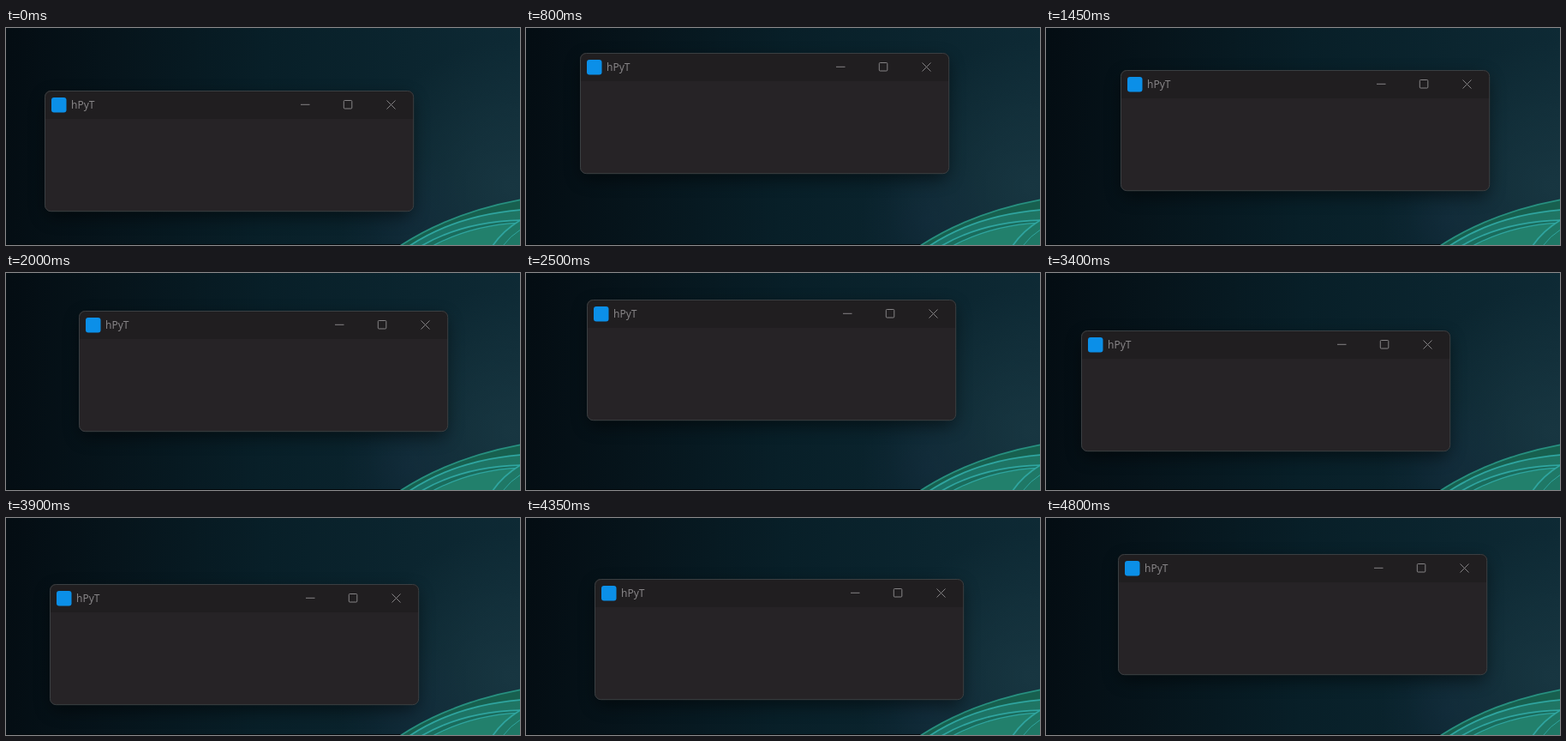
Animation of 600 by 253 pixels, one loop 4.85 s. Source, as an HTML page:

```html
<!DOCTYPE html>
<html lang="en">
<head>
<meta charset="utf-8">
<title>Circling window</title>
<style>
  html, body { margin: 0; width: 100%; height: 100%; overflow: hidden; background: #04121a; }
  svg { display: block; width: 100vw; height: 100vh; }
  text { font: 12px "Noto Sans", "Open Sans", sans-serif; }
</style>
</head>
<body>
<svg viewBox="0 0 600 253">
  <defs>
    <linearGradient id="sky" gradientUnits="userSpaceOnUse" x1="0" y1="100" x2="600" y2="130">
      <stop offset="0" stop-color="#040d13"/>
      <stop offset=".2" stop-color="#06141b"/>
      <stop offset=".5" stop-color="#081f28"/>
      <stop offset=".78" stop-color="#0b252f"/>
      <stop offset="1" stop-color="#0e2a35"/>
    </linearGradient>
    <radialGradient id="glow" gradientUnits="userSpaceOnUse" cx="590" cy="185" r="170">
      <stop offset="0" stop-color="#1b3a45" stop-opacity=".75"/>
      <stop offset="1" stop-color="#1b3a45" stop-opacity="0"/>
    </radialGradient>
    <radialGradient id="haze" gradientUnits="userSpaceOnUse" cx="470" cy="225" r="80">
      <stop offset="0" stop-color="#1a3148" stop-opacity=".3"/>
      <stop offset="1" stop-color="#1a3148" stop-opacity="0"/>
    </radialGradient>
    <linearGradient id="petal" x1="0" y1="1" x2="1" y2="0">
      <stop offset="0" stop-color="#1b7469"/>
      <stop offset="1" stop-color="#1f7563"/>
    </linearGradient>
    <filter id="blur" x="-20%" y="-50%" width="140%" height="200%">
      <feGaussianBlur stdDeviation="10"/>
    </filter>
  </defs>

  <rect width="600" height="253" fill="url(#sky)"/>
  <rect width="600" height="253" fill="url(#glow)"/>
  <rect width="600" height="253" fill="url(#haze)"/>
  <rect y="252" width="462" height="1" fill="#03090c"/>

  <g stroke="#2fa5a0" stroke-width="1.8">
    <path d="M460 254Q520 215 602 200V255Z" fill="#17604f" stroke="#279080"/>
    <path d="M471 254Q526 218 602 212V255Z" fill="url(#petal)"/>
    <path d="M485 254Q535 225 602 224V255Z" fill="#1a6c5c"/>
    <path d="M498 254Q545 229 602 227V255Z" fill="#22806c" stroke-width="1.2"/>
    <path d="M568 254Q580 236 602 223V255Z" fill="#1f7866"/>
    <path d="M580 254Q588 243 602 234" fill="none" stroke-width="1"/>
  </g>

  <g id="win">
    <rect x="2" y="8" width="427" height="139" rx="8" fill="#000" opacity=".5" filter="url(#blur)"/>
    <rect width="431" height="141" rx="7.5" fill="#262326"/>
    <path d="M0 33V7.5Q0 0 7.5 0H423.5Q431 0 431 7.5V33Z" fill="#201e20"/>
    <rect x=".5" y=".5" width="430.2" height="140.2" rx="7" fill="none" stroke="#3a3f42"/>
    <rect x="8" y="8" width="17.5" height="17.5" rx="3" fill="#0b8fe8"/>
    <text x="31" y="21.3" fill="#868486">hPyT</text>
    <g fill="none" stroke="#858385">
      <path d="M299 16.3H309.5"/>
      <rect x="349.3" y="11.5" width="9.5" height="9.5" rx="1"/>
      <path d="M399.5 11.5L409.5 21.5M409.5 11.5L399.5 21.5"/>
    </g>
  </g>
</svg>
<script>
  const LOOP = 4850, STEP = 50;
  const CENTER = { x: 62.2, y: 54.1 }, RADIUS = 25;
  // [step, accumulated angle in degrees]: nearly even clockwise turning
  const TURNS = [[0, 132.5], [16, 631.4], [29, 1068.5], [50, 1730.5],
                 [59, 2014.5], [78, 2636], [96, 3211]];
  const win = document.getElementById("win");

  function angleAt(step) {
    let i = 1;
    while (i < TURNS.length - 1 && TURNS[i][0] < step) i++;
    const [s0, a0] = TURNS[i - 1], [s1, a1] = TURNS[i];
    return (a0 + (a1 - a0) * (step - s0) / (s1 - s0)) * Math.PI / 180;
  }

  function render(ms) {
    const angle = angleAt(Math.floor((ms % LOOP) / STEP));
    const x = Math.round(CENTER.x + RADIUS * Math.cos(angle));
    const y = Math.round(CENTER.y + RADIUS * Math.sin(angle));
    win.setAttribute("transform", `translate(${x} ${y})`);
  }

  const start = performance.now();
  function tick() {
    render(performance.now() - start);
    requestAnimationFrame(tick);
  }
  tick();
</script>
</body>
</html>
```
